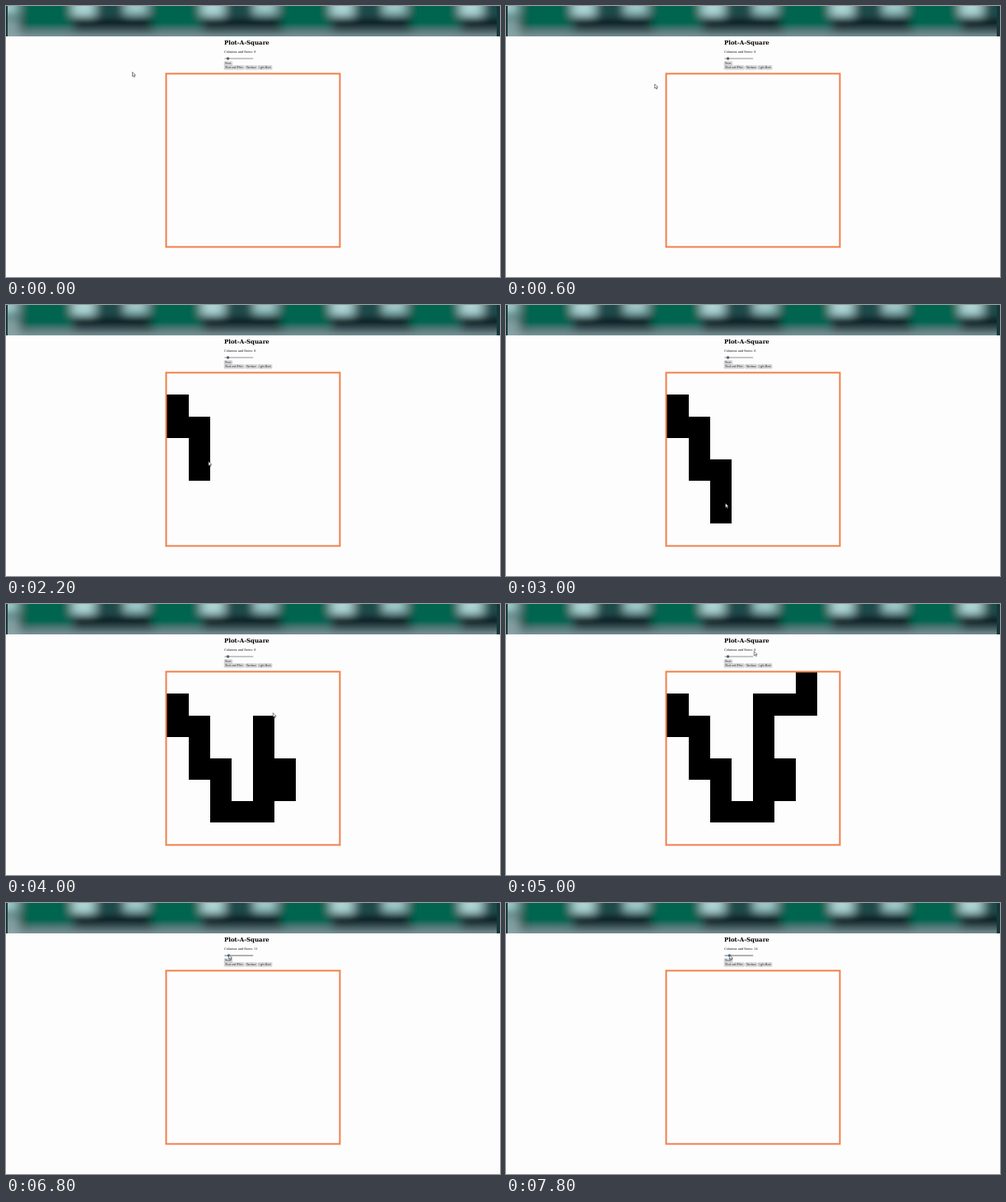
An HTML page that plays this animation: 600 px wide and 330 px high, repeating every 8 s.

```html
<!DOCTYPE html>
<html lang="en">
<head>
<meta charset="utf-8">
<title>Drawing grid</title>
<style>
  html, body { margin: 0; width: 100%; height: 100%; overflow: hidden; background: #fefdfe; }
  svg { display: block; width: 100%; height: 100%; }
  .serif { font-family: "DejaVu Serif", serif; fill: #000; }
  .label { font: 2.85px "Open Sans", sans-serif; fill: #111; text-anchor: middle; }
</style>
</head>
<body>
<svg viewBox="0 0 600 330" xmlns="http://www.w3.org/2000/svg">
  <defs>
    <clipPath id="bar"><rect x="2" width="594" height="37"/></clipPath>
    <filter id="blur" x="-10%" y="-60%" width="120%" height="220%"><feGaussianBlur stdDeviation="6 4"/></filter>
    <linearGradient id="haze" x2="0" y2="1">
      <stop offset=".55" stop-color="#8fa5a8" stop-opacity="0"/>
      <stop offset="1" stop-color="#8fa5a8" stop-opacity=".75"/>
    </linearGradient>
  </defs>
  <rect width="600" height="330" fill="#fefdfe"/>
  <rect width="600" height="37" fill="#17383a"/>
  <g clip-path="url(#bar)">
    <rect width="600" height="37" fill="#31595a"/>
    <g id="blobs" filter="url(#blur)"></g>
    <rect width="600" height="37" fill="url(#haze)"/>
  </g>
  <text class="serif" x="265" y="47" font-size="7" font-weight="bold">Plot-A-Square</text>
  <text class="serif" id="count" x="265" y="57" font-size="3.5"></text>
  <rect id="track" x="265.3" y="63.5" width="35" height="1" rx=".5"/>
  <circle id="thumb" cy="64" r="1.7"/>
  <g id="buttons"></g>
  <g id="cells" shape-rendering="crispEdges"></g>
  <g fill="none" stroke="#ef7f49">
    <rect x="194.5" y="82.4" width="211" height="211" stroke-width="2.8" opacity=".25"/>
    <rect x="194.5" y="82.4" width="211" height="211" stroke-width="1.7"/>
  </g>
  <path id="cursor" d="M0 0V5.3L1.3 4.2L2.1 6.1L3 5.7L2.2 3.8H3.8Z" fill="#fff" stroke="#333" stroke-width=".6" stroke-linejoin="round"/>
</svg>
<script>
const LOOP = 8000, TICK = 200;
const PEN_DOWN = 1200, PEN_UP = 5000, GRAB = 6000, CLEAR = 6600;
const LEFT = 195.4, TOP = 83.3, SIZE = 26.15, COUNT = 8;
const $ = id => document.getElementById(id);

function add(parent, tag, attrs, text) {
  const el = document.createElementNS("http://www.w3.org/2000/svg", tag);
  for (const k in attrs) el.setAttribute(k, attrs[k]);
  if (text) el.textContent = text;
  return parent.appendChild(el);
}

// The blurred bar repeats the same group of soft patches.
function blob(x, y, width, height, fill) {
  add($("blobs"), "rect", { x, y, width, height, fill });
}
for (let x = -137; x < 600; x += 157) {
  blob(x + 62, 14, 98, 22, "#0c2428");
  blob(x, -10, 58, 36, "#04654f");
  blob(x + 60, -10, 28, 23, "#acd3d3");
  blob(x + 90, -10, 34, 22, "#1d4a4a");
  blob(x + 124, -10, 28, 21, "#9cc6c6");
}
blob(-20, 14, 36, 40, "#7d9c9d");

function button(x, y, width, text) {
  add($("buttons"), "rect", {
    x, y, width, height: 4.5, rx: .6, fill: "#e5e5e8", stroke: "#8b8b90", "stroke-width": .35
  });
  add($("buttons"), "text", { x: x + width / 2, y: y + 3.2, class: "label" }, text);
}
button(265.2, 67.8, 9.4, "Reset");
button(265.2, 72.7, 23.9, "Black and White");
button(290.7, 72.7, 14.2, "Rainbow");
button(306.2, 72.7, 16.7, "Light-Black");

// Pointer keys: time, x, y
const path = [
  [0, 153.5, 80.5], [1200, 207.8, 109.6], [1600, 210, 145], [2000, 236, 175],
  [2400, 256, 206], [3000, 266.5, 241.5], [3400, 314, 247], [3600, 338, 209],
  [3800, 318, 190], [4000, 324.3, 132.6], [4800, 365, 119.5], [4900, 366, 82],
  [5000, 301.3, 57.6], [6000, 270, 63], [7800, 271.7, 63.4]
];

function pointer(t) {
  const i = Math.max(1, path.findIndex(key => key[0] >= t));
  const [t0, x0, y0] = path[i - 1], [t1, x1, y1] = path[i];
  const k = (t - t0) / (t1 - t0);
  return [x0 + (x1 - x0) * k, y0 + (y1 - y0) * k];
}

// Every cell the pointer crosses turns black shortly afterwards.
const cells = new Map();
for (let t = PEN_DOWN; t < PEN_UP; t += 5) {
  const [x, y] = pointer(t);
  const col = Math.floor((x - LEFT) / SIZE), row = Math.floor((y - TOP) / SIZE);
  const key = row * COUNT + col;
  if (row < 0 || cells.has(key)) continue;
  const el = add($("cells"), "rect", {
    x: LEFT + col * SIZE, y: TOP + row * SIZE, width: SIZE, height: SIZE
  });
  cells.set(key, { el, start: t + 15 });
}

function render(time) {
  const t = Math.floor(time % LOOP / TICK) * TICK;
  const [x, y] = pointer(t);
  $("cursor").setAttribute("transform", `translate(${x} ${y})`);

  for (const { el, start } of cells.values())
    el.setAttribute("visibility", t >= start && t < CLEAR ? "visible" : "hidden");

  const value = t < CLEAR ? COUNT : Math.min(14, 10 + (t - CLEAR) / TICK);
  const active = t >= GRAB;
  $("count").textContent = "Columns and Rows: " + value;
  $("thumb").setAttribute("cx", 267.1 + value * .31);
  $("thumb").setAttribute("fill", active ? "#1879b5" : "#5d5d63");
  $("track").setAttribute("fill", active ? "#66666b" : "#8f8f94");
}

const begin = performance.now();
function frame() {
  render(performance.now() - begin);
  requestAnimationFrame(frame);
}
frame();
</script>
</body>
</html>
```
